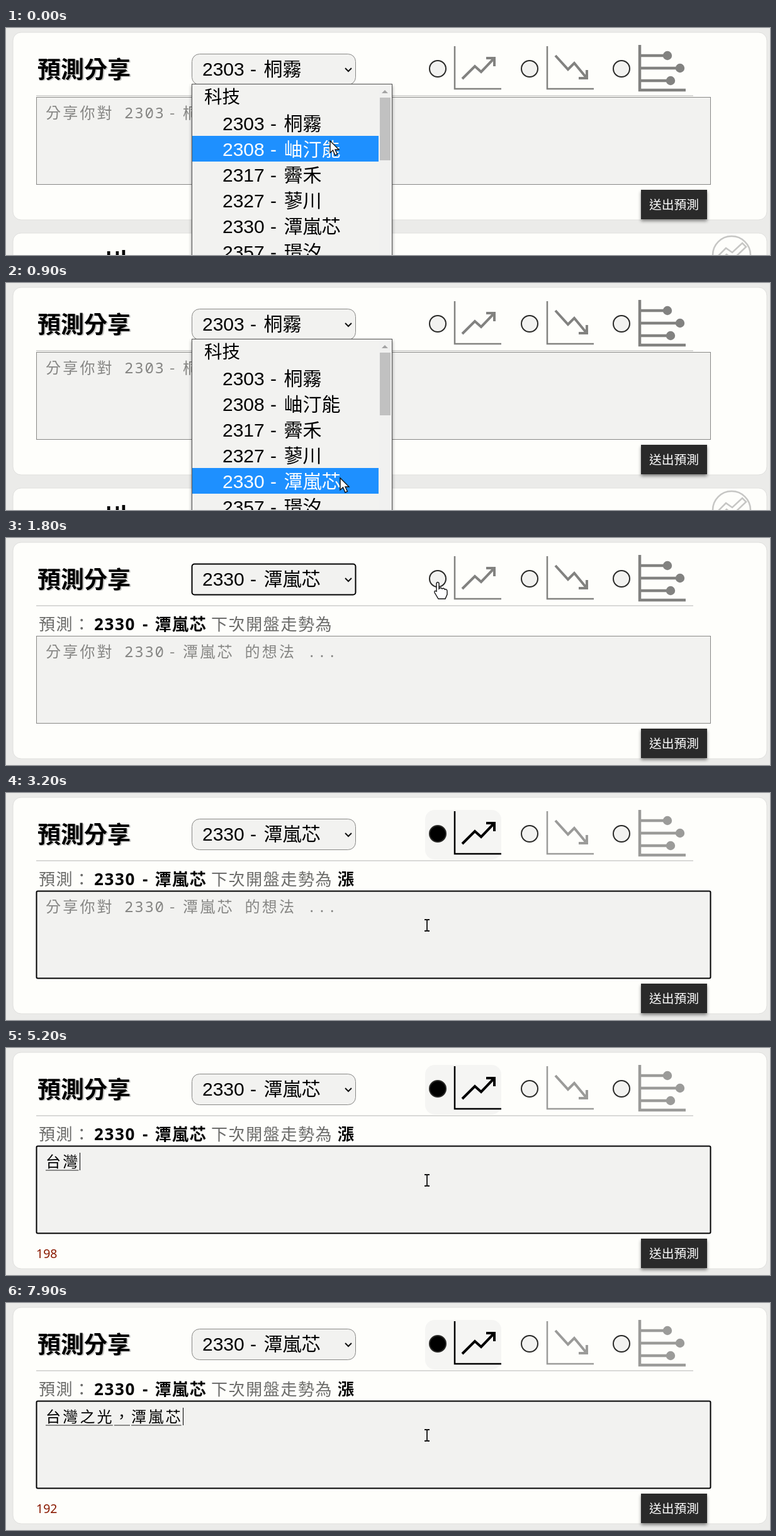
Recreate the animation shown at these times as an HTML page. Size 1214 by 362 pixels, loop 8 s.

```html
<!DOCTYPE html>
<html lang="zh-Hant">
<head>
<meta charset="utf-8">
<title>預測分享</title>
<style>
  :root { --page: #ebebe9; --card: #fefefb; --field: #f2f2f0; --icon: #828280; --pale: #9b9b99; }
  html, body { margin: 0; width: 100%; height: 100%; overflow: hidden; background: var(--page); }
  svg { display: block; width: 1214px; height: 362px; }
  text { white-space: pre; font-family: "Noto Sans CJK TC", "Noto Sans CJK", sans-serif; }
  .stock { font: 300 30px "Liberation Sans", "Noto Sans CJK TC", "Noto Sans CJK", sans-serif; }
  .title { font-size: 37px; font-weight: 700; }
  .group { font-size: 28.5px; font-weight: 500; }
  .line { font-size: 26px; font-weight: 300; letter-spacing: 1.6px; fill: #6b6b69; }
  .strong { font-family: "Noto Sans", "Noto Sans CJK TC", "Noto Sans CJK", sans-serif; font-weight: 700; fill: #000; }
  .note { font-size: 24px; font-weight: 300; letter-spacing: 3.2px; }
  .hint { fill: #868684; }
  .mono { font-family: "Noto Sans Mono", monospace; font-weight: 500; letter-spacing: 1.8px; }
  .count { font: 500 19.5px "Noto Sans", sans-serif; fill: #8a1a00; }
  .card { fill: var(--card); stroke: #dfdfdd; }
  .field { fill: var(--field); }
  .radio { fill: var(--field); stroke: #2a2a28; stroke-width: 2; }
  .icon { color: var(--icon); fill: none; stroke: currentColor; }
  .icon circle { fill: currentColor; stroke: none; }
  .checked .icon { color: var(--pale); }
  .checked #up { color: #000; }
  .checked #radioUp { fill: #000; }
</style>
</head>
<body>
<svg id="stage" viewBox="0 0 1214 362"></svg>
<script>
const LOOP = 8000, CLOSED = 1200, CHECKED = 2000, FOCUSED = 2700;
const STOCKS = [
  ['2303', '桐霧'], ['2308', '岫汀能'], ['2317', '霽禾'],
  ['2327', '蓼川'], ['2330', '潭嵐芯'], ['2357', '璟汐']
];
const NOTE_X = 63, PITCH = 27.2, ROW = 41, LIST_TOP = 131;

const POINTER = [
  [0, 515, 180], [800, 531, 311], [1200, 531, 311],
  [1800, 686, 70], [2100, 686, 70], [2700, 669, 211]
];

const TYPED = [
  [0, ''], [4000, 'ㄊ'], [4200, 'ㄊㄞ'], [4400, '台'], [5000, '台ㄨㄢ'], [5200, '台灣'],
  [5400, '台灣ㄓ'], [5600, '台灣之'], [5700, '台灣之ㄍㄨ'], [5900, '台灣之ㄍㄨㄤ'],
  [6100, '台灣之光'], [6500, '台灣之光，'], [6800, '台灣之光，ㄊ'], [6900, '台灣之光，ㄊㄢ'],
  [7100, '台灣之光，潭'], [7300, '台灣之光，潭ㄌ'], [7500, '台灣之光，潭嵐'],
  [7700, '台灣之光，潭嵐ㄒㄧㄣ'], [7900, '台灣之光，潭嵐芯']
];
const WORDS = [[0, 4], [4, 5], [5, 12]];

const text = (x, y, cls, str, extra = '') =>
  `<text x="${x}" y="${y}" class="${cls}" ${extra}>${str}</text>`;
const stock = (x, y, [code, name], extra = '') =>
  text(x, y, 'stock', `${code}<tspan x="${x + 76}">-</tspan><tspan x="${x + 97.5}">${name}</tspan>`, extra);
const box = (x, y, w, h, rx, extra) =>
  `<rect x="${x}" y="${y}" width="${w}" height="${h}" rx="${rx}" ${extra}/>`;
const radio = (x, id) => `<circle id="${id}" class="radio" cx="${x}" cy="65" r="13"/>`;
const trend = (id, x, line, head) =>
  `<g id="${id}" class="icon"><path d="M${x} 29V97H${x + 74}" stroke-width="2.5"/>
   <path d="${line}${head}" stroke-width="4"/></g>`;
const bars = [[44, 1051], [64, 1071], [84, 1056]].map(([y, x]) =>
  `<path d="M1008 ${y}H${x}" stroke-width="4.5"/><circle cx="${x}" cy="${y}" r="7.2"/>`).join('');

const picked = STOCKS[4];
const stage = document.getElementById('stage');
stage.innerHTML = `
<defs>
  <filter id="soft" x="-20%" y="-20%" width="140%" height="150%">
    <feDropShadow dx="0" dy="3" stdDeviation="2.5" flood-color="#000" flood-opacity=".45"/>
  </filter>
</defs>
${box(11, 7, 1198, 299, 13, 'id="card" class="card"')}
<g id="nextCard">
  ${box(11, 327, 1198, 90, 13, 'class="card"')}
  ${text(158, 380, 'title', 'Ul', 'style="font-size:32px"')}
  <g fill="none" stroke="#c6c6c4" stroke-width="2.5"><circle cx="1153" cy="362" r="30"/>
    <path d="M1131 364L1144 351L1154 358L1170 343L1176 349L1155 369L1145 361L1136 370Z"/></g>
</g>
${text(52, 81, 'title', '預測分享', 'fill="#c4c4c2"')}
${text(50, 79.5, 'title', '預測分享')}
<path d="M48 108H1092" stroke="#d9d9d7" stroke-width="2"/>
${box(295.5, 41.5, 260, 49, 12, 'id="select" class="field"')}
<g id="before">${stock(312, 76, STOCKS[0])}</g>
<g id="after">${stock(312, 76, picked)}</g>
<path d="M539 64L544 69L549 64" fill="none" stroke="#111" stroke-width="2"/>
${box(666, 27, 121, 79, 15, 'id="chosen" fill="#f5f5f3"')}
${radio(686, 'radioUp')}${radio(832, 'radioDown')}${radio(978, 'radioFlat')}
${trend('up', 713, 'M725 81L745 61L755 70L775 49', 'M763 48H776V61')}
${trend('down', 860, 'M873 44L893 66L903 56L922 79', 'M910 80H923V67')}
<g id="flat" class="icon"><path d="M1007 27V99H1080" stroke-width="4.5"/>${bars}</g>
<g id="forecast">
  ${text(52, 147, 'line', '預測：')}
  ${text(140, 147, 'line strong', `${picked[0]}<tspan x="217">-</tspan><tspan x="236.5">${picked[1]}</tspan>`)}
  ${text(326, 147, 'line', '下次開盤走勢為')}
  ${text(527, 147, 'line strong', '漲', 'id="rise"')}
</g>
<g id="lower">
  ${box(48.5, 110.5, 1071, 139, 0, 'id="area" class="field"')}
  <g id="hint">
    ${text(63, 144, 'note hint', '分享你對')}
    ${text(188, 144, 'note hint mono', '', 'id="hintCode"')}
    ${text(260, 144, 'note hint', '-')}
    ${text(281, 144, 'note hint', '', 'id="hintName"')}
    ${text(0, 144, 'note hint', '的想法', 'id="hintTail"')}
    ${text(0, 144, 'note hint mono', '...', 'id="hintDots"')}
  </g>
  ${text(NOTE_X, 144, 'note', '', 'id="note"')}
  <path id="underline" stroke="#222"/>
  <path id="caret" stroke="#000"/>
  ${text(48, 289, 'count', '', 'id="count"')}
  ${box(1009, 258, 105, 47, 0, 'fill="#2c2c2a" filter="url(#soft)"')}
  ${text(1022, 289, '', '送出預測', 'font-size="19.8" fill="#fff"')}
</g>
<g id="list">
  ${box(295.5, 89.5, 318, 300, 0, 'class="field" stroke="#555" filter="url(#soft)"')}
  ${text(315, 120, 'group', '科技')}
  ${box(296, 0, 296, ROW, 0, 'id="highlight" fill="#1e90ff"')}
  ${STOCKS.map((s, i) => stock(344, LIST_TOP + 32 + i * ROW, s, 'data-row')).join('')}
  <rect x="592" y="90" width="21" height="272" fill="#f1f1f0"/>
  <path d="M597 104L602 99L607 104Z" fill="#a3a3a3"/>
  <rect x="594" y="111" width="17" height="100" fill="#c1c1c1"/>
</g>
<g id="cursor" fill="#fff" stroke="#111" stroke-width="1.4">
  <path id="arrow" d="M0 0V19L4.5 15L8 23L11.5 21.5L8 14H14Z"/>
  <path id="hand" d="M-2 2Q0-1 2 2V11Q5 8 7 11Q10 9 11 12Q15 11 15 15V20L12 27H1L-5 17Q-6 13-2 15Z"/>
  <path id="beam" d="M-4-9H-1L0-8L1-9H4M0-8V8M-4 9H-1L0 8L1 9H4" fill="none" stroke-width="1.8"/>
</g>`;

const el = {};
stage.querySelectorAll('[id]').forEach(node => el[node.id] = node);
const rows = [...stage.querySelectorAll('[data-row]')];

const show = (id, on) => { el[id].style.display = on ? '' : 'none'; };
const set = (id, attrs) => { for (const k in attrs) el[id].setAttribute(k, attrs[k]); };
const ease = k => k * k * (3 - 2 * k);

function pointerAt(t) {
  const next = POINTER.findIndex(p => p[0] > t);
  if (next < 0) return POINTER[POINTER.length - 1].slice(1);
  const [a, b] = [POINTER[next - 1], POINTER[next]];
  const k = ease((t - a[0]) / (b[0] - a[0]));
  return [a[1] + (b[1] - a[1]) * k, a[2] + (b[2] - a[2]) * k];
}

function drawPointer(t, open) {
  const [x, y] = pointerAt(t);
  const hand = !open && x > 666 && x < 787 && y < 106;
  const beam = !open && y > 156 && y < 296;
  set('cursor', { transform: `translate(${x} ${y})` });
  show('hand', hand);
  show('beam', beam);
  show('arrow', !hand && !beam);
  const active = Math.floor((y - LIST_TOP) / ROW);
  set('highlight', { y: LIST_TOP + active * ROW });
  rows.forEach((row, i) => row.setAttribute('fill', i === active ? '#fff' : '#000'));
}

function drawNote(t) {
  const typed = TYPED.filter(step => step[0] <= t).pop()[1];
  const n = typed.length, at = i => NOTE_X + i * PITCH;
  const caretX = Math.round(at(n)) + 0.5;
  el.note.textContent = typed;
  set('underline', {
    d: WORDS.filter(w => w[0] < n)
      .map(([from, to]) => `M${at(from)} 149H${at(Math.min(to, n)) - 2}`).join('') || 'M0 0'
  });
  set('caret', { d: n ? `M${caretX} 121V149` : `M${caretX} 118V146` });
  show('caret', t >= 3700 || (t >= FOCUSED && t < 3200));
  show('hint', !n);
  show('count', t >= 3500);
  el.count.textContent = 200 - typed.replace(/[ㄅ-ㄩ]/g, '').length;
}

function draw(t) {
  const open = t < CLOSED, checked = t >= CHECKED, focused = t >= FOCUSED;
  const selectFocus = !open && !checked;
  const [code, name] = open ? STOCKS[0] : picked;
  const nameEnd = 281 + name.length * PITCH;
  const outline = on => ({ stroke: on ? '#000' : '#888886', 'stroke-width': on ? 2 : 1 });

  stage.classList.toggle('checked', checked);
  for (const id of ['list', 'before', 'nextCard']) show(id, open);
  for (const id of ['after', 'forecast']) show(id, !open);
  for (const id of ['rise', 'chosen']) show(id, checked);
  set('card', { height: open ? 299 : 345 });
  set('lower', { transform: `translate(0 ${open ? 0 : 46})` });
  set('select', { rx: selectFocus ? 4 : 12, ...outline(selectFocus) });
  set('area', { rx: focused ? 2 : 0, ...outline(focused) });

  el.hintCode.textContent = code;
  el.hintName.textContent = name;
  set('hintTail', { x: nameEnd + 17 });
  set('hintDots', { x: nameEnd + 116 });
  drawNote(t);
  drawPointer(t, open);
}

const start = performance.now();
function tick() {
  const t = (performance.now() - start) % LOOP;
  draw(Math.floor(t / 100) * 100);
  requestAnimationFrame(tick);
}
tick();
</script>
</body>
</html>
```
